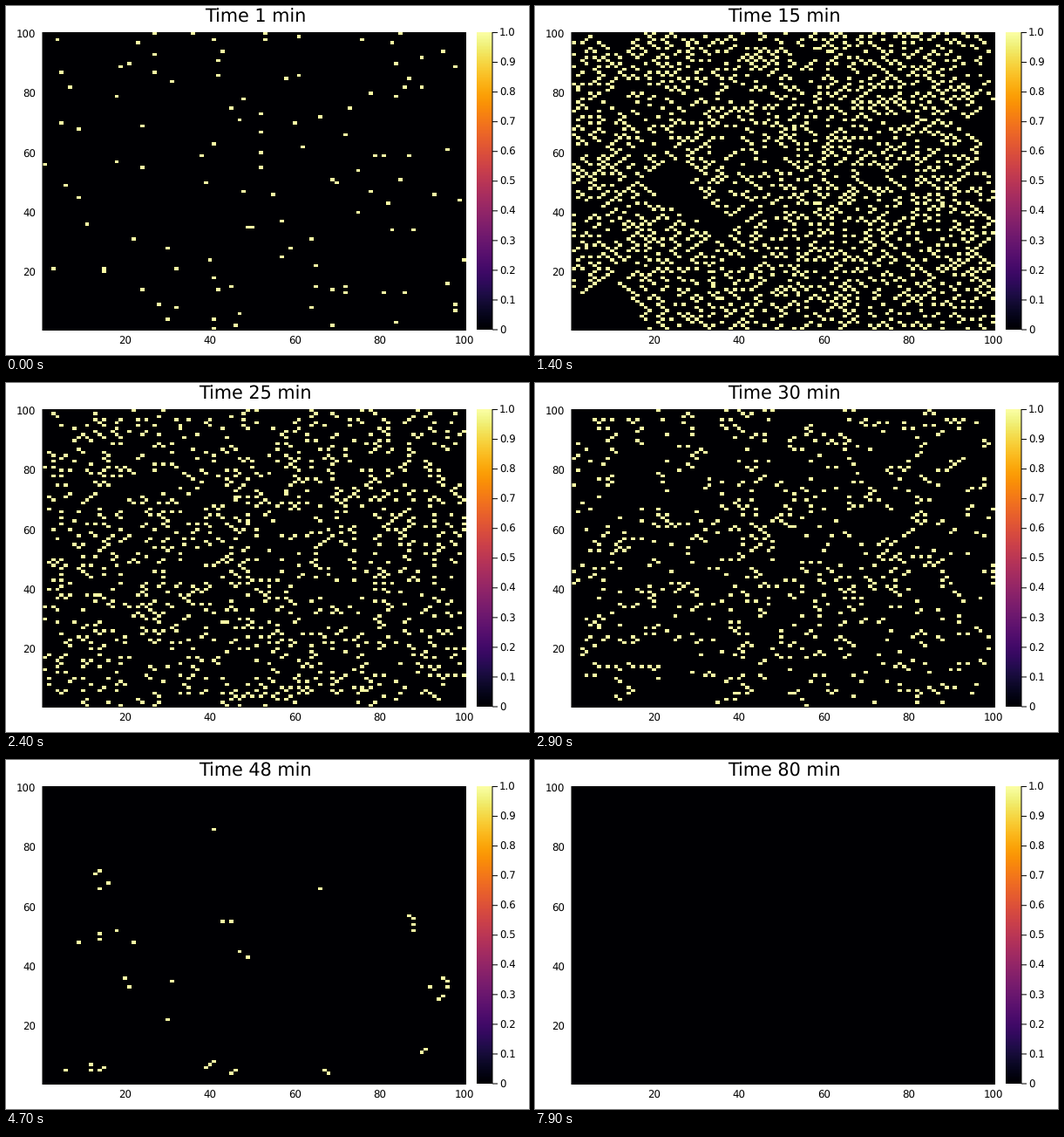
Write a matplotlib script that moves like this. It is 600 px wide and 400 px high and loops after 8000 ms.

```python
import numpy as np
import matplotlib.pyplot as plt
from matplotlib.animation import FuncAnimation

WIDTH, HEIGHT, DPI = 600, 400, 100
MINUTES, INTERVAL = 80, 100
SIZE = 100
LEFT, RIGHT, TOP, BOTTOM = 42, 528, 30, 371
BAR_LEFT, BAR_RIGHT = 540, 558
REST = 3          # minutes a cell stays quiet after being active
CROWDING = 0.15   # chance to accept a cell beside another active one

# Number of active cells through the outbreak
TIMES = [1, 3, 5, 8, 11, 14, 16, 21, 30, 37, 45, 54, 59]
COUNTS = [112, 235, 480, 1050, 1650, 1950, 1900, 1400, 720, 190, 60, 8, 0]

plt.rcParams.update({"font.family": "DejaVu Sans", "text.hinting": "none"})


def beside(grid):
    """Cells that share a side with an active cell."""
    padded = np.pad(grid, 1)
    return (padded[:-2, 1:-1] | padded[2:, 1:-1]
            | padded[1:-1, :-2] | padded[1:-1, 2:])


def spread(recent, count, rng):
    """Activity moves to rested side neighbours, mostly keeping gaps."""
    free = beside(recent[-1]) & ~np.any(recent, axis=0)
    sites = rng.permutation(np.argwhere(free))
    following = np.zeros((SIZE, SIZE), dtype=bool)
    left = count
    for row, col in sites:
        if left == 0:
            break
        crowded = (following[max(row - 1, 0):row + 2, col].any()
                   or following[row, max(col - 1, 0):col + 2].any())
        if not crowded or rng.random() < CROWDING:
            following[row, col] = True
            left -= 1
    return following


def simulate():
    rng = np.random.default_rng(11)
    grid = np.zeros((SIZE, SIZE), dtype=bool)
    grid.flat[rng.choice(grid.size, COUNTS[0], replace=False)] = True
    history = [grid]
    for minute in range(2, MINUTES + 1):
        count = int(round(np.interp(minute, TIMES, COUNTS)))
        history.append(spread(history[-REST:], count, rng))
    return history


def px(size):
    return size * 72 / DPI


fig = plt.figure(figsize=(WIDTH / DPI, HEIGHT / DPI), dpi=DPI, facecolor="white")
ax = fig.add_axes([0, 0, 1, 1])


def label(x, y, text, align, size=11.8):
    return ax.text(x, y, text, ha=align, va="baseline", fontsize=px(size),
                   color="black")


def line(xs, ys):
    ax.plot(xs, ys, color="black", lw=px(1), solid_capstyle="butt", snap=False)


history = simulate()
heat = ax.imshow(history[0].astype(float), cmap="inferno", vmin=0, vmax=1,
                 origin="lower", interpolation="nearest", aspect="auto",
                 extent=(LEFT, RIGHT, BOTTOM, TOP))
ax.imshow(np.linspace(0, 1, 256)[:, None], cmap="inferno", origin="lower",
          interpolation="nearest", aspect="auto",
          extent=(BAR_LEFT, BAR_RIGHT, BOTTOM, TOP))

line([LEFT, LEFT], [TOP, BOTTOM + 1])
line([LEFT, RIGHT], [BOTTOM + 0.5] * 2)
for value in range(20, SIZE + 1, 20):
    share = (value - 0.5) / SIZE
    label(LEFT + share * (RIGHT - LEFT), 387.7, str(value), "center")
    label(34.6, BOTTOM - share * (BOTTOM - TOP) + 5.3, str(value), "right")

line([BAR_RIGHT, BAR_RIGHT], [TOP, BOTTOM])
for tenth in range(11):
    y = BOTTOM - tenth / 10 * (BOTTOM - TOP - 0.5)
    line([BAR_RIGHT, 564], [y, y])
    label(566, y + 4.5, f"{tenth / 10:.1f}" if tenth else "0", "left")

title = label((LEFT + RIGHT) / 2 + 0.8, 19, "", "center", 20.8)

ax.set_xlim(0, WIDTH)
ax.set_ylim(HEIGHT, 0)
ax.axis("off")


def update(frame):
    heat.set_data(history[frame].astype(float))
    title.set_text(f"Time {frame + 1} min")
    return heat, title


animation = FuncAnimation(fig, update, frames=MINUTES, interval=INTERVAL,
                          repeat=True, repeat_delay=0)
plt.show()
```
